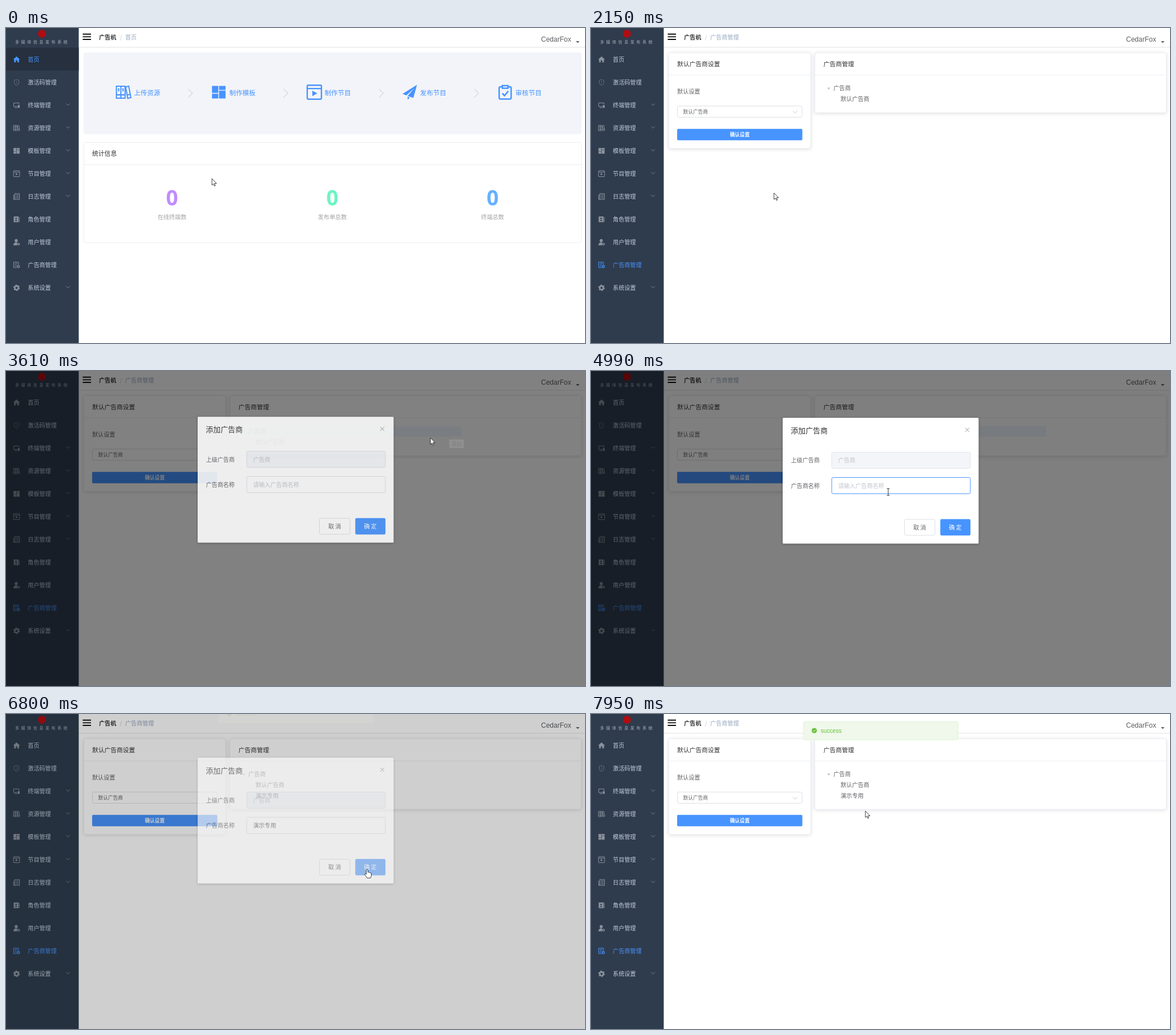
Recreate the animation shown at these times as an HTML page. Size 1015 by 552 pixels, loop 8 s.

```html
<!DOCTYPE html>
<html lang="zh-CN">
<head>
<meta charset="utf-8">
<title>广告商管理</title>
<style>
html, body { margin: 0; width: 100%; height: 100%; overflow: hidden; background: #fff; }
svg { display: block; width: 1015px; height: 552px; font-family: "Noto Sans CJK SC", "Noto Sans CJK", sans-serif; }
text { white-space: pre; }
.latin { font-family: "Liberation Sans", sans-serif; }
.wide { font-family: "Open Sans", sans-serif; }
.card { filter: drop-shadow(0 1px 3px rgba(0, 0, 0, .13)); }
.line { fill: none; stroke: currentColor; }
.solid { fill: currentColor; }
</style>
</head>
<body>
<svg id="stage" viewBox="0 0 1015 552"></svg>
<script>
const BLUE = '#4794ff', INK = '#303133', BODY = '#606266', PALE = '#c0c4cc', EDGE = '#dcdfe6';
const LOOP = 8000;

// Runs of screen updates: first, last, count. The picture holds in between.
const RUNS = [
  [150, 920, 11], [1010, 1760, 11], [1840, 2600, 11], [2680, 3080, 6], [3380, 4150, 11],
  [4220, 4300, 2], [4450, 4610, 3], [4990, 4990, 1], [5390, 5390, 1], [5610, 6000, 6],
  [6240, 6470, 4], [6800, 7410, 9], [7720, 7950, 4]
];

// Pointer path: time, x, y
const PATH = [
  [80, 361, 264], [720, 78, 438], [920, 72.5, 421], [1780, 72.5, 421], [2600, 669, 104],
  [2620, 669, 104], [3080, 777, 105], [3455, 777, 105], [4150, 521, 200], [4300, 521, 212],
  [5380, 521, 212], [5390, 554, 232], [5560, 554, 232], [6000, 633, 272], [6830, 633, 272],
  [7410, 543, 240], [7650, 543, 240], [7950, 481, 170]
];

const text = (x, y, s, size = 10.1, fill = BODY, extra = '') =>
  `<text x="${x}" y="${y}" font-size="${size}" fill="${fill}" ${extra}>${s}</text>`;
const rect = (x, y, w, h, fill, extra = '') =>
  `<rect x="${x}" y="${y}" width="${w}" height="${h}" fill="${fill}" ${extra}/>`;
const line = (d, width = 1, extra = '') => `<path class="line" d="${d}" stroke-width="${width}" ${extra}/>`;
const solid = (d, extra = '') => `<path class="solid" d="${d}" ${extra}/>`;
const group = (id, body, extra = '') => `<g id="${id}" ${extra}>${body}</g>`;
const at = (x, y, scale, color, body) =>
  `<g transform="translate(${x} ${y}) scale(${scale})" color="${color}">${body}</g>`;
const mid = 'text-anchor="middle"';

const ICON = {
  home: solid('M0-5.6L6 0H4.3V5H1.3V1.5H-1.3V5H-4.3V0H-6z'),
  shield: line('M0-5L4-3.6V.6Q4 4 0 5.3Q-4 4-4 .6V-3.6zM0-2V.8M0 1.8V2.6', .8, 'opacity=".7"'),
  screen: line('M1 2.3H-5V-4H4.3V-1M-3 4.4H1') + solid('M2 0H5.5V4.6H2z'),
  books: line('M-5.4-4.6H-2V4.6H-5.4zM-2-4.6H1.2V4.6H-2zM1.6-4L4-4.6 5.6 4.1 3.2 4.7zM-5 2H-2.4M-1.6 2H.8M2.8 2.2L5 1.6M-3.7-3V-.6M-.4-3V-.6', .9),
  grid: solid('M-5.4-5H-.4V.6H-5.4zM.2-5H5.4V-1.8H.2zM.2-1.2H5.4V5H.2zM-5.4 1.2H-.4V5H-5.4z'),
  play: line('M-4.6-5.2H4.6Q5.3-5.2 5.3-4.4V4.4Q5.3 5.2 4.6 5.2H-4.6Q-5.3 5.2-5.3 4.4V-4.4Q-5.3-5.2-4.6-5.2zM-5-2.7H5') + solid('M-1.5-1.2L2.2.9-1.5 3z'),
  log: line('M-3-5H5V5H-3zM-5-3V5H-3M-1-2.5H3.4M-1 0H3.4M-1 2.5H3.4', 1.1),
  role: solid('M-5-5H3.4V5H-5zM4.2-4H5.2V5H4.2z') + '<circle cy="-1.4" cx="-.8" r="1.4" fill="#2f3c4e"/><path d="M-3 3Q-.8-1 1.4 3z" fill="#2f3c4e"/>',
  user: solid('M-.6-5.6A2.7 2.9 0 0 1-.6.2 2.7 2.9 0 0 1-.6-5.6zM-5.6 5.4Q-5.2.4-.6.4L1.2 1V5.4z') + '<circle class="line" cx="3.6" cy="3.4" r="1.6" stroke-width="1.2"/>',
  advert: line('M0 4.6H-5V-5H3.4V-.6M-3-2.5H1.5M-3 0H0M-3 2.4H-1') + '<circle class="line" cx="3" cy="2.8" r="2.2" stroke-width="1.1"/>' + line('M2 2.8H4', .9),
  gear: '<circle class="line" r="3.2" stroke-width="2.6"/><circle class="line" r="4.9" stroke-width="1.6" stroke-dasharray="2.56"/>',
  plane: solid('M13-13L-12.5 3-5.5 5.6 8-7-3.4 6.8 6.6 10z') + solid('M-3.8 8L.4 9.4-3.2 13z'),
  clip: line('M-5-9.5H-8Q-10.5-9.5-10.5-7V9.5Q-10.5 12-8 12H8Q10.5 12 10.5 9.5V-7Q10.5-9.5 8-9.5H5M-5-11.5H5V-7H-5z', 2.5) + line('M-5 2L-1 6 5.5-2', 2.6)
};

const MENU = [
  ['home', '首页'], ['shield', '激活码管理'], ['screen', '终端管理', 1], ['books', '资源管理', 1],
  ['grid', '模板管理', 1], ['play', '节目管理', 1], ['log', '日志管理', 1], ['role', '角色管理'],
  ['user', '用户管理'], ['advert', '广告商管理'], ['gear', '系统设置', 1]
];
const STEPS = [
  ['上传资源', 'books', 206, 2.3], ['制作模板', 'grid', 373, 2.2], ['制作节目', 'play', 540.5, 2.35],
  ['发布节目', 'plane', 707.5, 1], ['审核节目', 'clip', 875, 1]
];
const STATS = [['在线终端数', 291, '#c08cff'], ['发布单总数', 572, '#6cf5c3'], ['终端总数', 853, '#66b1ff']];

const sidebar = rect(0, 0, 127.5, 552, '#2f3c4e') +
  '<circle cx="63" cy="10" r="7" fill="#b00d12"/>' +
  text(16, 27, '多媒体信息发布系统', 7, '#aab2bc', 'letter-spacing="3.6"') +
  MENU.map(([icon, label, more], i) => {
    const y = 55 + i * 40;
    return rect(0, y - 20.5, 127.5, 40, '#26303e', `id="bg${i}" opacity="0"`) +
      `<g id="icon${i}" color="#8b929c" transform="translate(18.5 ${y + .3})">${ICON[icon]}</g>` +
      text(38.3, y + 3.8, label, 10.1, '#bfcbd9', `id="label${i}"`) +
      (more ? line(`M105.5 ${y - 2.5}l3.3 3 3.3-3`, .8, 'color="#8b929c"') : '');
  }).join('');

const header = line('M127.5 33.8H1015', 1, 'color="#e2e2e2"') +
  line('M134.5 10.8H149M134.5 15.4H149M134.5 20H149', 1.9, 'color="#111"') +
  text(163, 20, '广告机', 10.1, INK, 'font-weight="700"') + text(199.5, 20, '/', 10, PALE) +
  text(209, 20, '首页', 10.1, '#97a8be', 'id="crumbA"') + text(209, 20, '广告商管理', 10.1, '#97a8be', 'id="crumbB"') +
  text(938, 24.4, 'CedarFox', 12, '#5c5e62', 'class="latin"') +
  solid('M999 23H1005.4L1002.2 26.2z', 'color="#5a5e66"');

const home = rect(136, 43, 873, 143, '#f3f4f9', 'rx="3"') +
  STEPS.map(([label, icon, x, k], i) => at(x, 112.5, k, BLUE, ICON[icon]) +
    text(224.2 + i * 167.2, 118.2, label, 11.5, BLUE) +
    (i < 4 ? line(`M${319.5 + i * 167.2} 107l7.5 7.3-7.5 7.3`, 1, `color="${PALE}"`) : '')).join('') +
  rect(136.5, 200.5, 872, 175.5, '#fff', 'stroke="#ebeef5" rx="3"') + line('M137 239.5H1008', 1, 'color="#ebeef5"') +
  text(151, 223.7, '统计信息', 10.8, INK) +
  STATS.map(([label, x, c]) => text(x, 310.6, '0', 37, c, `class="wide" font-weight="700" ${mid}`) +
    text(x, 335.3, label, 10.1, '#a3a3a3', mid)).join('');

const card = 'class="card" stroke="#ebeef5" rx="3"';
const adverts = rect(136.5, 43.5, 248.5, 167.5, '#fff', card) + rect(392.5, 43.5, 616, 105, '#fff', card + ' id="treeCard"') +
  line('M137 82.2H384.5M393 82.2H1008', 1, 'color="#ebeef5"') +
  text(151, 66.8, '默认广告商设置', 10.75, INK) + text(407.5, 66.8, '广告商管理', 10.75, INK) +
  text(151, 114.6, '默认设置') + rect(151.5, 136.8, 218.5, 19.6, '#fff', `stroke="${EDGE}" rx="2.5"`) +
  text(161.5, 149.6, '默认广告商', 8.7) + line('M354 145.5l3.8 3.6 3.8-3.6', .9, `color="${PALE}"`) +
  rect(151, 176.8, 219.5, 20, BLUE, 'rx="2"') + text(260.8, 190.2, '确认设置', 8.7, '#fff', `font-weight="700" ${mid}`) +
  rect(408, 96.8, 390, 18.4, '#f0f7ff', 'id="row"') + solid('M413.8 104.6H419.6L416.7 108z', `color="${PALE}"`) +
  text(425, 109.4, '广告商') + text(437.5, 128, '默认广告商') + text(437.5, 146.6, '演示专用', 10.1, BODY, 'id="added"') +
  group('add', line('M763.5 106H770.5M767 102.5V109.5', .9) + text(774, 109.5, '添加', 9.2, BLUE), `color="${BLUE}"`);

const dialog = rect(336, 82, 343.5, 220.5, '#fff', 'rx="1.5" style="filter:drop-shadow(0 1px 2px rgba(0,0,0,.3))"') +
  text(350.3, 109.3, '添加广告商', 12.95, INK) + line('M656 99.6l7 7m0-7l-7 7', 1, 'color="#909399"') +
  text(350.5, 160.4, '上级广告商') + text(350.5, 204.6, '广告商名称') +
  rect(422, 142.3, 243, 28.4, '#f3f5f9', 'stroke="#e0e3ea" rx="2.5"') + text(433.2, 160.4, '广告商', 10.1, PALE) +
  rect(422, 186.6, 243, 28.4, '#fff', `id="field" stroke="${EDGE}" rx="2.5"`) +
  text(433.2, 204.6, '请输入广告商名称', 10.1, PALE, 'id="hint"') + text(433.2, 204.6, '演示专用', 10.1, BODY, 'id="value"') +
  rect(433, 194.5, .9, 13, '#333', 'id="caret"') +
  rect(549.5, 260, 53.5, 28, '#fff', `stroke="${EDGE}" rx="2.5"`) + text(576.2, 277.6, '取 消', 10.1, BODY, `font-weight="500" ${mid}`) +
  rect(612.3, 259.6, 52.9, 28.7, BLUE, 'id="ok" rx="2.5"') + text(638.7, 277.6, '确 定', 10.1, '#fff', `font-weight="500" ${mid}`);

const message = rect(372.5, 13.3, 271, 32, '#eff8ea', 'stroke="#e1f3d8" rx="2.5"') +
  '<circle cx="391.4" cy="29" r="4.6" fill="#67c23a"/>' + line('M389.2 29.1l1.6 1.6 2.9-3', 1, 'color="#fff"') +
  text(402.8, 33, 'success', 10.1, '#67c23a', 'class="latin"');

const pointer =
  group('arrow', '<path d="M0 0V11.4L2.6 9 4.3 13 6 12.2 4.4 8.4H8z" fill="#fff" stroke="#111" stroke-width=".8"/>') +
  group('hand', '<path d="M-1.4 8.5V1.2Q0-.8 1.4 1.2V5.3Q2.7 4.4 3.5 5.7 5 5 5.6 6.5 7.4 6 7.4 8V11Q7.2 13 6 15.4H0Q-1.5 12.5-3.7 9.9-4.6 8-3.1 7.7-2.2 7.7-1.4 8.9z" fill="#fff" stroke="#111" stroke-width=".8"/>') +
  group('beam', line('M-2.5-6H2.5M0-6V6M-2.5 6H2.5', .9, 'color="#222"'));

document.getElementById('stage').innerHTML =
  rect(0, 0, 1015, 552, '#fff') + group('home', home) + group('adverts', adverts) + header + sidebar +
  group('status', rect(-2, 542, 338.5, 20, '#fff', 'stroke="#cfd2d6" rx="2.5"') +
    text(1, 553, 'localhost:9999/#/advertisers/index', 8.8, '#5f6368', 'class="wide"')) +
  group('bar', solid('M-72 0H0V2z', 'opacity=".6"'), `color="${BLUE}"`) +
  group('spin', line('M0-6.3A6.3 6.3 0 0 1 0 6.3', 1.5), `color="${BLUE}"`) +
  rect(0, 0, 1015, 552, '#000', 'id="mask"') +
  group('tip', rect(777, 120, 25.5, 15, '#fff', 'rx="1"') + text(789.7, 130.8, '添加', 8.6, BODY, mid)) +
  group('dialog', dialog) + group('message', message) + group('pointer', pointer);

const $ = id => document.getElementById(id);
const fade = (id, v) => $(id).setAttribute('opacity', v);
const show = (id, on) => fade(id, on ? 1 : 0);
const move = (id, x, y, more = '') => $(id).setAttribute('transform', `translate(${x} ${y}) ${more}`);
const clamp = v => Math.min(1, Math.max(0, v));
const within = (t, a, b) => t >= a && t < b;
const mix = (a, b, p) => '#' + [1, 3, 5].map(i => {
  const [u, v] = [a, b].map(c => parseInt(c.slice(i, i + 2), 16));
  return Math.round(u + (v - u) * p).toString(16).padStart(2, '0');
}).join('');

// CSS "ease" curve, solved by bisection
function ease(x) {
  x = clamp(x);
  let lo = 0, hi = 1, s = x;
  for (let i = 0; i < 18; i++) {
    s = (lo + hi) / 2;
    const bx = .75 * s * (1 - s) ** 2 + .75 * s * s * (1 - s) + s ** 3;
    if (bx < x) lo = s; else hi = s;
  }
  return .3 * s * (1 - s) ** 2 + 3 * s * s * (1 - s) + s ** 3;
}
const ramp = (t, start, len) => ease((t - start) / len);

function held(t) {
  let out = 0;
  for (const [a, b, n] of RUNS) {
    if (t < a) break;
    const step = (b - a) / (n - 1) || 1;
    out = a + Math.min(n - 1, Math.floor((t - a) / step + .15)) * step;
  }
  return out;
}

function locate(t) {
  const i = PATH.findIndex(k => k[0] > t);
  if (i === 0) return PATH[0].slice(1);
  if (i < 0) return PATH[PATH.length - 1].slice(1);
  const [a, b] = [PATH[i - 1], PATH[i]];
  const u = (t - a[0]) / (b[0] - a[0]), p = u * u * (3 - 2 * u);
  return [a[1] + (b[1] - a[1]) * p, a[2] + (b[2] - a[2]) * p];
}

function draw(now) {
  const t = held(now), [x, y] = locate(t);
  const isOpen = within(t, 3437, 7020);
  const onOk = isOpen && x > 612 && x < 665 && y > 260 && y < 288;
  const inField = isOpen && x > 422 && x < 665 && y > 186 && y < 215;
  const hover = x < 127 ? Math.round((y - 55) / 40) : -1;

  move('pointer', x, y);
  show('hand', hover >= 0 || onOk);
  show('beam', inField);
  show('arrow', hover < 0 && !onOk && !inField);

  // Menu
  MENU.forEach((_, i) => show('bg' + i, hover === i));
  fade('bg0', 1 - ramp(t, 915, 300));
  const lit = ramp(t, 1160, 300);
  $('icon0').setAttribute('color', t < 920 ? BLUE : '#8b929c');
  $('icon9').setAttribute('color', t < 920 ? '#8b929c' : BLUE);
  $('label0').setAttribute('fill', mix(BLUE, '#bfcbd9', lit));
  $('label9').setAttribute('fill', mix('#bfcbd9', BLUE, lit));

  // Route change
  const crumb = ramp(t, 1160, 500);
  fade('crumbA', 1 - crumb);
  move('crumbA', crumb * 14.3, 0);
  fade('crumbB', crumb);
  move('crumbB', (1 - crumb) * 14.3, 0);
  fade('home', 1 - ramp(t, 1160, 280));
  fade('adverts', ramp(t, 1440, 280));
  show('status', within(t, 1080, 1960));
  fade('bar', within(t, 1010, 1700) ? 1 - ramp(t, 1330, 250) : 0);
  move('bar', 128 + 857 * ramp(t, 980, 330) + 102 * ramp(t, 1310, 200), 0);
  fade('spin', within(t, 1010, 1700) ? 1 - ramp(t, 1330, 250) : 0);
  move('spin', 999.3, 16.2, `rotate(${(t - 1310) * .9})`);

  // Tree
  const saved = t >= 6728;
  show('row', within(t, 2500, 6728));
  show('add', within(t, 2500, 3520));
  show('added', saved);
  $('treeCard').setAttribute('height', saved ? 123.5 : 105);
  fade('tip', within(t, 3520, 3670) ? .12 : 0);

  // Dialog
  const seen = saved ? 1 - ramp(t, 6728, 300) : ramp(t, 3437, 300);
  const shade = saved ? 1 - ramp(t, 6728, 200) : ramp(t, 3437, 200);
  fade('mask', shade * .5);
  fade('dialog', seen);
  move('dialog', 0, (seen - 1) * 14.3);
  const typed = t >= 5390;
  show('hint', !typed);
  show('value', typed);
  $('field').setAttribute('stroke', mix(EDGE, BLUE, ramp(t, 4400, 200) - ramp(t, 6200, 250)));
  show('caret', within(t, 4450, 4980) || within(t, 5390, 5910));
  $('caret').setAttribute('x', typed ? 473.7 : 433);
  $('ok').setAttribute('fill', onOk ? '#6aa9ff' : BLUE);

  // Notice
  fade('message', ramp(t, 6765, 300));
  move('message', 0, (ramp(t, 6765, 400) - 1) * 32);
}

const begin = performance.now();
function tick() {
  draw((performance.now() - begin) % LOOP);
  requestAnimationFrame(tick);
}
tick();
</script>
</body>
</html>
```
